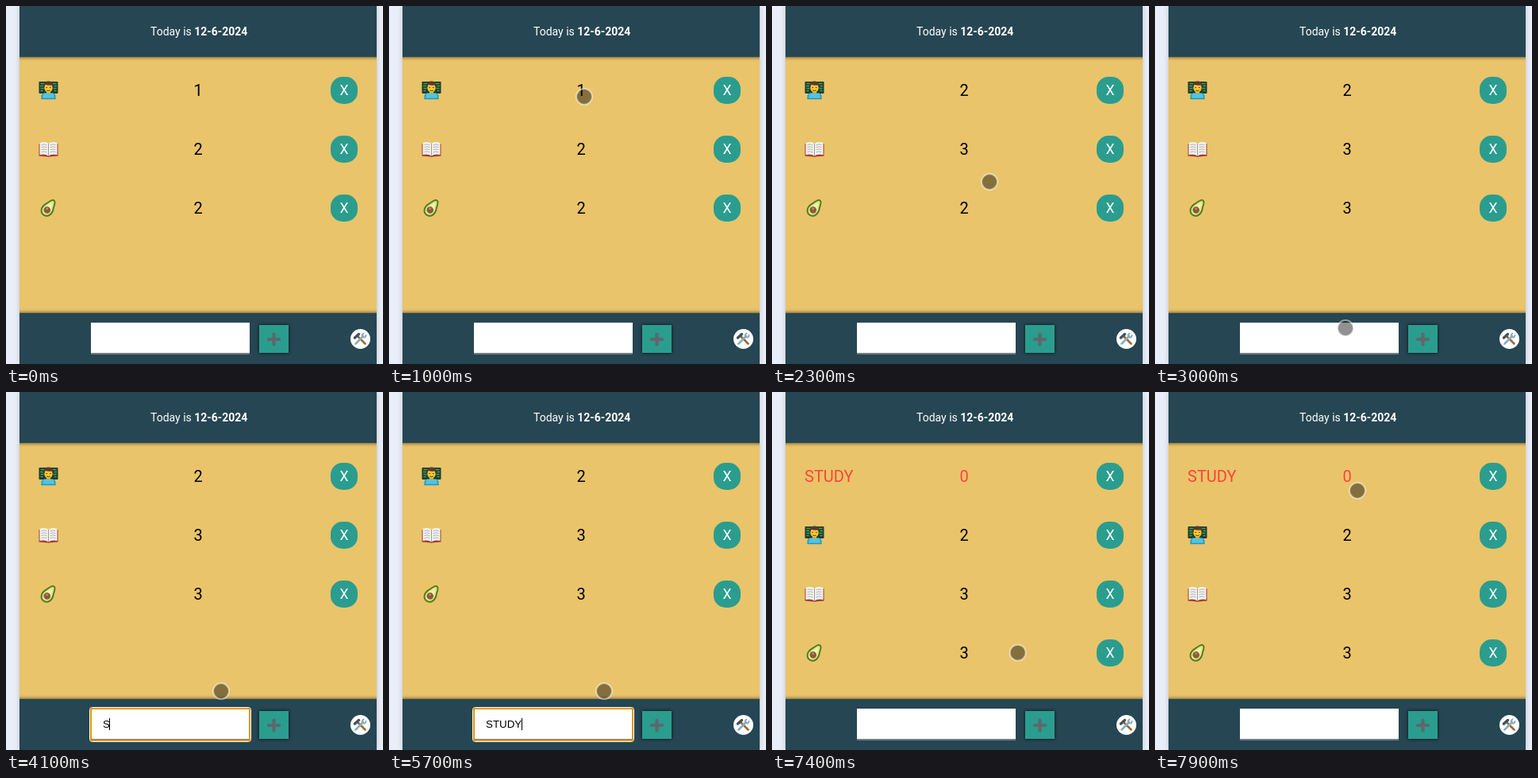
An HTML page for the animation above (8 s loop, 475 px wide and 450 px high).

```html
<!DOCTYPE html>
<html lang="en">
<head>
<meta charset="utf-8">
<title>Daily counter</title>
<style>
  html, body { margin: 0; width: 100%; height: 100%; overflow: hidden; background: #eaeef8; }
  svg { display: block; }
  text { font-family: Roboto, sans-serif; }
  .bar { fill: #264653; filter: drop-shadow(0 0 2.5px rgba(0,0,0,.75)); }
  .panel { fill: #e9c46a; filter: drop-shadow(0 0 3px rgba(0,0,0,.2)); }
  .count { font-size: 20px; text-anchor: middle; }
  .remove { font-size: 17.6px; text-anchor: middle; fill: #fff; }
  .new { fill: #fa443a; }
  #typed { font: 13.333px "Liberation Sans", Arial, sans-serif; }
</style>
</head>
<body>
<svg id="stage" width="475" height="450" viewBox="0 0 475 450">
  <defs>
    <g id="coder">
      <rect x="0" y="1" width="24" height="15" rx="1" fill="#26382f"/>
      <path d="M2 3.5h5M1.500 6.500h4M2 9.500h4M2 12.500h3M17 3.500h5M19 6.500h3.500M18 9.500h4M19 12.500h3" stroke="#35a553" stroke-width="1.300"/>
      <path d="M3 23V18.500Q4 15 9 15H15Q20 15 21 18.500V23Z" fill="#18a8ba"/>
      <path d="M9.500 12h5v4l-2.500 2-2.500-2z" fill="#dfa51d"/>
      <ellipse cx="12" cy="8.800" rx="5.200" ry="6" fill="#fcc62f"/>
      <path d="M6.200 8.500Q5 0 12 .4Q19 0 17.800 8.500L16.500 5.500Q11 6 8 4.800Z" fill="#553b30"/>
      <path d="M9 8.500h1.500M13.500 8.500H15M9.800 12Q12 13.300 14.200 12" stroke="#4b3429" fill="none"/>
      <path d="M5.500 16h13l1 6.500h-15z" fill="#4fc5e8"/>
      <path d="M3 22.500h18" stroke="#2f8fae" stroke-width="1.500"/>
    </g>
    <g id="book">
      <path d="M0 5L12 7 24 5V20.500L13 21.500 12 22 11 21.500 0 20.500Z" fill="#a63a34"/>
      <path d="M1 4Q8 1.500 12 5Q16 1.500 23 4V19Q16 17.500 12 20.500Q8 17.500 1 19Z" fill="#f4f3ef"/>
      <path d="M3 6.500Q7 5 10 7M3 9.500Q7 8 10 10M3 12.500Q7 11 10 13M3 15.500Q7 14 10 16M14 7Q17 5 21 6.500M14 10Q17 8 21 9.500M14 13Q17 11 21 12.500M14 16Q17 14 21 15.500" stroke="#a5a9ab" stroke-width=".9" fill="none"/>
      <path d="M12 5v15.500" stroke="#9c9c98"/>
    </g>
    <g id="avocado" transform="rotate(36 12 12)">
      <path d="M12 -.8C16 -.8 16.500 5 18.500 9C22 16 18.500 23.500 12 23.500S2 16 5.500 9C7.500 5 8 -.8 12 -.8Z" fill="#527a27"/>
      <path d="M12 1.300C14.500 1.300 15 6 16.800 9.800C19.500 16 17 21.500 12 21.500S4.500 16 7.200 9.800C9 6 9.500 1.300 12 1.300Z" fill="#dce775"/>
      <path d="M12 4C13.500 5 13.800 8 15.300 10.500C17.500 16 15.500 20 12 20S6.500 16 8.700 10.500C10.200 8 10.500 5 12 4Z" fill="#f3efb0"/>
      <circle cx="12" cy="15" r="4.300" fill="#8a5a3c"/>
      <circle cx="11" cy="13.700" r="1.400" fill="#b98b6c"/>
    </g>
  </defs>

  <rect class="panel" x="17" width="450" height="450"/>
  <svg x="17" width="450" height="450" viewBox="17 0 450 450">
    <rect class="bar" x="7" y="-10" width="470" height="74"/>
    <rect class="bar" x="7" y="386" width="470" height="74"/>
  </svg>
  <text x="182" y="37" font-size="14" fill="#fff">Today is <tspan font-weight="bold">12-6-2024</tspan></text>

  <g id="rows"></g>

  <rect x="107" y="398" width="200" height="40" fill="#fff"/>
  <rect x="107" y="436" width="200" height="2" fill="#767d7f"/>
  <g id="focus" fill="none">
    <rect x="105.500" y="396.500" width="203" height="43" rx="3" stroke="#fff"/>
    <rect x="107" y="398" width="200" height="40" rx="1.500" stroke="#e59700" stroke-width="2"/>
  </g>
  <text id="typed" x="122" y="422"></text>
  <path id="spelling" d="M122 424.500H168" stroke="#e53935" stroke-width="1.500" stroke-dasharray="2 1.500"/>
  <rect id="caret" y="410" width="1" height="15"/>

  <rect x="319" y="401" width="37" height="35" fill="#2a9d8f" style="filter:drop-shadow(0 0 2px rgba(0,0,0,.8))"/>
  <path d="M331 419h13M337.500 412.500v13" stroke="#5d686c" stroke-width="4.200" stroke-linecap="round"/>

  <circle cx="446.500" cy="418.500" r="12.500" fill="#fff"/>
  <g fill="none" stroke-linecap="round">
    <path d="M443 415L452.500 424.500" stroke="#a7632f" stroke-width="2.500"/>
    <path d="M439.500 417L444.500 412.500" stroke="#45545c" stroke-width="3.500"/>
    <path d="M440.500 424.500L450 415" stroke="#82aebf" stroke-width="2.500"/>
    <path d="M450.500 411.500Q447 414 450 416Q453 417.500 453.500 414" stroke="#82aebf" stroke-width="2"/>
  </g>

  <circle id="pointer" r="10" stroke="#fff" stroke-opacity=".5" stroke-width="2"/>
</svg>
<script>
const $ = id => document.getElementById(id);
const LOOP = 8000, STEP = 100, ROW_GAP = 74;
const FOCUS = 3300, ADD = 7100;

// Pointer stops: time, x, y
const stops = [
  [500, 380, 308], [1000, 246, 114], [1100, 249, 110], [1400, 249, 110],
  [1900, 282, 175], [2100, 282, 175], [2300, 274, 221], [2500, 267, 252],
  [2800, 267, 252], [3000, 240, 405], [3400, 240, 405], [3500, 271, 376],
  [6500, 271, 376], [6900, 335, 422], [7100, 335, 422], [7900, 255, 124]
];
const typing = [[FOCUS, ''], [4100, 'S'], [5100, ''], [5400, 'ST'], [5500, 'STU'],
  [5600, 'STUD'], [5700, 'STUDY']];

// Each habit's count goes up by one at its click time
const habits = [
  { icon: 'coder', count: 1, click: 1300 },
  { icon: 'book', count: 2, click: 2100 },
  { icon: 'avocado', count: 2, click: 2800 }
];

function makeRow(label, count, className = '') {
  const row = document.createElementNS('http://www.w3.org/2000/svg', 'g');
  row.innerHTML = `${label}
    <text class="count ${className}" x="242" y="113">${count}</text>
    <rect x="409" y="89" width="34" height="34" rx="15" fill="#2a9d8f"/>
    <text class="remove" x="426" y="112">X</text>`;
  $('rows').append(row);
  return row;
}

const added = makeRow('<text class="new" x="41" y="113" font-size="20">STUDY</text>', 0, 'new');
for (const habit of habits) {
  habit.row = makeRow(`<g transform="translate(41.500 94)"><use href="#${habit.icon}"/></g>`, habit.count);
}

const show = (element, visible) => element.setAttribute('display', visible ? 'inline' : 'none');

function pointerAt(t) {
  const next = stops.findIndex(stop => stop[0] > t);
  if (next < 0) return stops.at(-1).slice(1);
  if (next === 0) return stops[0].slice(1);
  const [t0, x0, y0] = stops[next - 1], [t1, x1, y1] = stops[next];
  const p = (t - t0) / (t1 - t0), eased = p * p * (3 - 2 * p);
  return [x0 + (x1 - x0) * eased, y0 + (y1 - y0) * eased];
}

function draw(t) {
  const isAdded = t >= ADD;
  show(added, isAdded);
  habits.forEach(({ row, count, click }, i) => {
    row.setAttribute('transform', `translate(0 ${(i + isAdded) * ROW_GAP})`);
    row.querySelector('.count').textContent = count + (t >= click);
  });

  const focused = t >= FOCUS && !isAdded;
  const [typedAt, text] = typing.findLast(([time]) => time <= t) || [0, ''];
  $('typed').textContent = focused ? text : '';
  show($('focus'), focused);
  show($('spelling'), focused && t >= 6600);
  show($('caret'), focused && Math.floor((t - typedAt) / 500) % 2 === 0);
  const width = text ? $('typed').getComputedTextLength() : 0;
  $('caret').setAttribute('x', Math.floor(122 + width));

  const [x, y] = pointerAt(t);
  const pressed = t >= 6900 && t < ADD;
  show($('pointer'), t >= stops[0][0]);
  $('pointer').setAttribute('transform', `translate(${x} ${y})`);
  $('pointer').setAttribute('fill-opacity', pressed ? .62 : .43);
}

const start = performance.now();
function tick() {
  const t = (performance.now() - start) % LOOP;
  draw(Math.floor(t / STEP) * STEP);
  requestAnimationFrame(tick);
}
tick();
</script>
</body>
</html>
```
